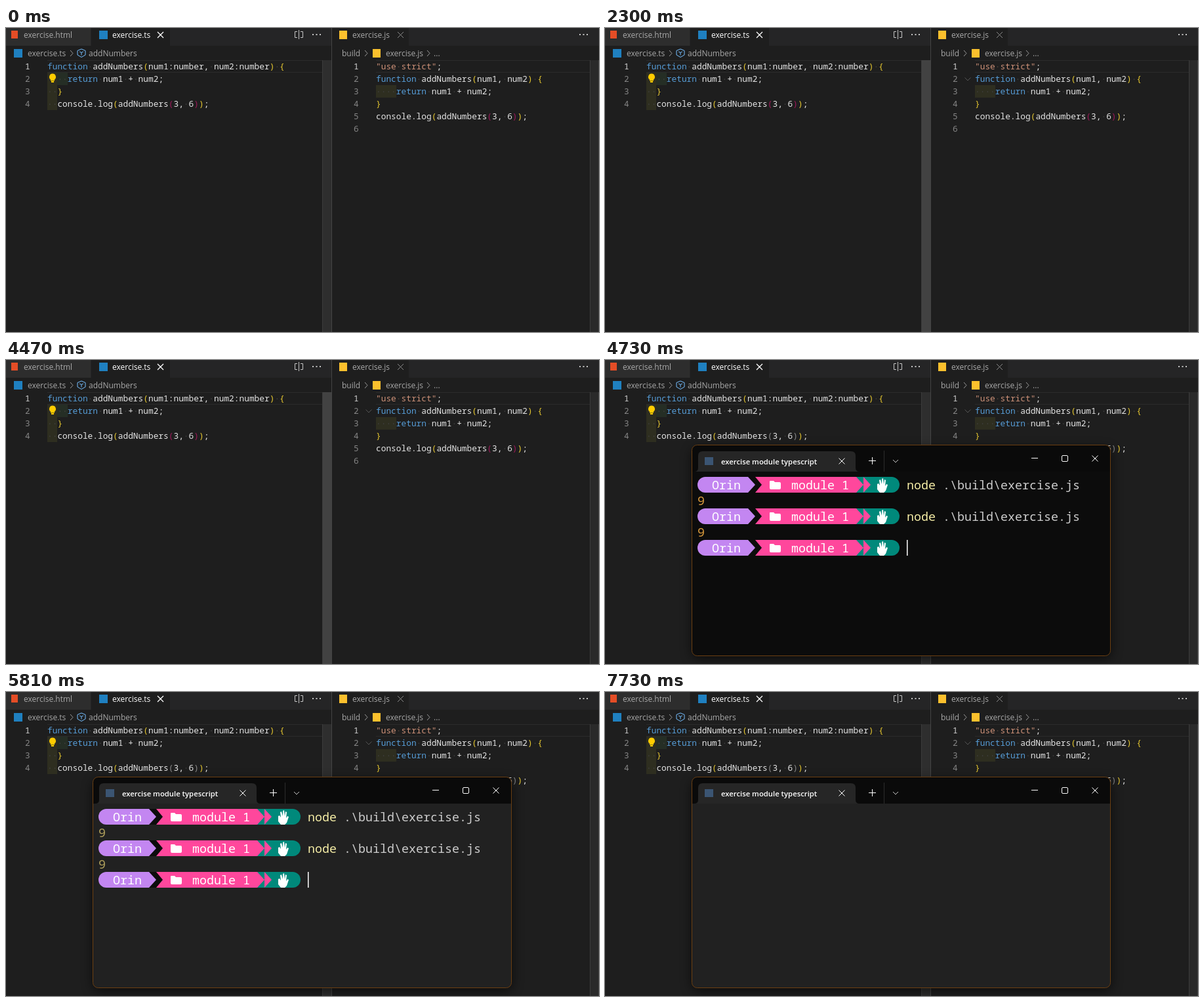
An HTML page that plays this animation: 904x463 px, repeating every 8 s.

```html
<!DOCTYPE html>
<html lang="en">
<head>
<meta charset="utf-8">
<title>Editor and terminal</title>
<style>
  html, body { margin: 0; width: 100%; height: 100%; overflow: hidden; background: #1e1e1e; }
  svg { display: block; width: 904px; height: 463px; }
  text { white-space: pre; }
  .ui { font: 12px "Open Sans", sans-serif; fill: #a9a9a9; }
  .code { font: 12.83px "Noto Sans Mono", monospace; fill: #e4e4e4; }
  .term { font: 500 18.33px "Noto Sans Mono", monospace; fill: #ccc; }
  .title { font: 600 11.3px "Open Sans", sans-serif; fill: #fff; }
  .line { fill: none; stroke: #c5c5c5; }
  .white { stroke: #fff; }
</style>
</head>
<body>
<svg viewBox="0 0 904 463">
  <defs>
    <filter id="shadow" x="-10%" y="-15%" width="120%" height="135%">
      <feGaussianBlur stdDeviation="9"/>
    </filter>
    <g id="prompt">
      <path fill="#0c0c0c" d="M218 0h22v24h-22z"/>
      <path fill="#c386f1" d="M153 0h65l11 12-11 12h-65a12 12 0 0 1 0-24z"/>
      <path fill="#00897b" d="M383 0h54a12 12 0 0 1 0 24h-54z"/>
      <path fill="#ff479c" d="M229 0h154l11 12-11 12H229l10-12zM394 0l11 12-11 12z"/>
      <path fill="#fff" d="M251 7q0-1 1-1h5l2 2h7q2 0 2 2v7q0 2-2 2h-13q-2 0-2-2z"/>
      <path fill="#fff" d="M415 11l2-1 2 3-1-8 2-1 2 7V3l2-1 1 9 1-7 2 1-1 9 2-3 2 1-3 9-3 3h-6l-4-5z"/>
      <text class="term" x="163" y="19" style="fill:#fff">Orin</text>
      <text class="term" x="284" y="19" style="fill:#fff">module 1</text>
    </g>
  </defs>

  <rect width="904" height="463" fill="#1e1e1e"/>
  <path fill="#252526" d="M0 0h496v27H0zM497 0h407v27H497z"/>
  <rect width="129" height="27" fill="#2d2d2d"/>
  <path fill="#1e1e1e" d="M130 0h120v27H130zM497 0h117v27H497z"/>

  <!-- tabs and breadcrumbs -->
  <rect x="8" y="4" width="10" height="12" fill="#e44d26"/>
  <path fill="#1f80c0" d="M142 4h13v13h-13zM12 32h13v13H12z"/>
  <path fill="#fbc02d" d="M508 4h12v13h-12zM559 32h12v13h-12z"/>
  <g class="ui">
    <text x="27" y="15">exercise.html</text>
    <text x="162" y="15" style="fill:#fff">exercise.ts</text>
    <text x="528" y="15">exercise.js</text>
    <text x="33" y="43">exercise.ts</text>
    <text x="126" y="43">addNumbers</text>
    <text x="512" y="43">build</text>
    <text x="579" y="43">exercise.js</text>
    <text x="652" y="43">...</text>
  </g>
  <path class="line white" stroke-width="1.3" d="M231 6l9 9m0-9l-9 9"/>
  <path class="line" style="stroke:#8c8c8c" d="M597 6l9 9m0-9l-9 9"/>
  <path class="line" d="M446.500 3v14M444 5.500h-3.500v9h3.500M449 5.500h3.500v9h-3.500"/>
  <path fill="#c5c5c5" d="M467 9h2v2h-2zm5.500 0h2v2h-2zm5.500 0h2v2h-2zM874 9h2v2h-2zm5.500 0h2v2h-2zm5.500 0h2v2h-2z"/>
  <path class="line" style="stroke:#999" d="M98 34l4 4.500-4 4.500M547 34l4 4.500-4 4.500M642 34l4 4.500-4 4.500"/>
  <path class="line" style="stroke:#75beff" d="M115 32l6 2.500v6.500l-6 3.500-6-3.500v-6.500zM112 36l3 1.500 3-1.500M115 37.500v4"/>

  <!-- editors -->
  <path class="line" style="stroke:#2b2b2b" d="M63 49.500h419M63 67.500h419M564 49.500h326M564 67.500h326"/>
  <path fill="#2e2e20" d="M63 68h15v57H63zM564 87h31v19h-31z"/>
  <path fill="#252e25" d="M78 68h16v19H78z"/>
  <g id="code"></g>
  <path fill="#fc0" d="M71 69.500a5 5 0 0 1 3 9v2h-6v-2a5 5 0 0 1 3-9zM69 81h4v2h-4z"/>
  <path id="fold" class="line" style="stroke:#555" d="M548.500 75.500l4.500 4.500 4.500-4.500"/>
  <rect id="leftBar" x="483" y="49" width="13" height="414"/>
  <rect id="rightBar" x="891" y="49" width="12" height="414"/>
  <path class="line" style="stroke:#3c3c3c" d="M482.500 49v414M890.500 49v414M903.500 49v414"/>
  <path class="line" style="stroke:#444" d="M496.500 0v463"/>

  <g id="terminal">
    <rect x="133" y="136" width="638" height="318" rx="8" filter="url(#shadow)" opacity=".65"/>
    <rect id="body" x="132.500" y="129.500" width="638" height="321" rx="8"/>
    <path fill="#0a0a0a" d="M133 170v-33q0-7 7-7h623q7 0 7 7v33z"/>
    <path fill="#262626" d="M136 170q6 0 6-6v-18q0-7 7-7h226q7 0 7 7v18q0 6 6 6z"/>
    <rect x="132.500" y="129.500" width="638" height="321" rx="8" fill="none" stroke="#6b3f12"/>
    <rect x="152" y="148" width="13" height="12" fill="#3b5573"/>
    <text class="title" x="177" y="159">exercise module typescript</text>
    <path class="line white" d="M356.500 149.500l9 9m0-9l-9 9M402 153.500h11M407.500 148v11M650 149.500h10M742.500 145.500l9 9m0-9l-9 9"/>
    <rect class="line white" x="696.500" y="145.500" width="9" height="9" rx="1.500"/>
    <path class="line" d="M439 152l4 4 4-4"/>
    <path class="line" style="stroke:#2c2c2c" d="M425.500 138v32"/>
    <g id="session">
      <use href="#prompt" y="178"/>
      <use href="#prompt" y="226"/>
      <use href="#prompt" y="274"/>
      <g id="commands" class="term"></g>
    </g>
    <rect id="cursor" width="1.500" height="24" fill="#fff"/>
  </g>
</svg>
<script>
const LOOP = 8000;
const $ = id => document.getElementById(id);
const set = (id, name, value) => $(id).setAttribute(name, value);
const show = (id, on) => set(id, "visibility", on ? "visible" : "hidden");

// Markup: {k keyword} {s string} {g outer bracket} {m inner bracket}
const styles = { k: "#569cd6", s: "#ce9178", g: "#e8c930", m: "#a0195a" };
const call = "console.log{g(}addNumbers{m(}3, 6{m)}{g)};";
const sources = [
  { x: 63, numberX: 29, rows: [
    "{kfunction} addNumbers{g(}num1:number, num2:number{g)} {g{}",
    "    {kreturn} num1 + num2;",
    "  {g}}",
    "  " + call ] },
  { x: 564, numberX: 530, rows: [
    "{s\"use strict\"};",
    "{kfunction} addNumbers{g(}num1, num2{g)} {g{}",
    "    {kreturn} num1 + num2;",
    "{g}}",
    call,
    "" ] }
];

const markUp = row => row
  .replace(/{([ksgm])(.[^}]*)}/g, (_, key, text) =>
    `<tspan class="${key}" fill="${styles[key]}">${text.replace(/ /g, "\u00a0")}</tspan>`)
  .replace(/ (?![^<]*>)/g, '<tspan fill="#424242">·</tspan>')
  .replace(/\u00a0/g, '</tspan><tspan fill="#5a473e">·</tspan><tspan fill="#ce9178">');

$("code").innerHTML = sources.map(({ x, numberX, rows }) => rows.map((row, i) => {
  const y = 63 + 19 * i;
  return `<text class="code" x="${numberX}" y="${y}" style="fill:${i ? "#858585" : "#d0d0d0"}">${i + 1}</text>
    <text class="code" x="${x}" y="${y}">${markUp(row)}</text>`;
}).join("")).join("");

const nodeCommand = '<tspan fill="#f5eda6">node</tspan> .\\build\\exercise.js';
$("commands").innerHTML = [0, 1].map(i => `
  <text x="460" y="${197 + 48 * i}">${nodeCommand}</text>
  <text class="result" x="141" y="${221 + 48 * i}">9</text>`).join("") +
  `<text id="recalled" x="460" y="293">${nodeCommand}</text>
   <text id="clear" x="460" y="293" fill="#f5eda6">cls</text>`;

const innerBrackets = document.querySelectorAll(".m");
const results = document.querySelectorAll(".result");

// Value of the last [time, value] step that has been reached.
const at = (t, steps) => steps.filter(([start]) => t >= start).pop()[1];

function draw(t) {
  const open = t >= 4730, cleared = t >= 7200;
  set("leftBar", "fill", at(t, [[0, "#2e2e2e"], [340, "#282828"], [1820, "#363636"],
    [1890, "#424242"], [4060, "#484848"], [4470, "#424242"], [4730, "#2e2e2e"]]));
  set("rightBar", "fill", at(t, [[0, "#2a2a2a"], [340, "#424242"], [1820, "#383838"],
    [1890, "#303030"], [2300, "#2a2a2a"]]));
  show("fold", t >= 1820);
  innerBrackets.forEach(b => b.setAttribute("fill", open ? "#8a8a8a" : styles.m));

  set("terminal", "display", open ? "inline" : "none");
  set("body", "fill", at(t, [[0, "#0c0c0c"], [4800, "#212121"]]));
  results.forEach(r => r.style.fill = t < 4800 ? "#d99a3c" : "#b0a05c");
  set("session", "display", cleared ? "none" : "inline");
  set("recalled", "display", t >= 6140 && t < 6540 ? "inline" : "none");
  set("clear", "display", t >= 6540 ? "inline" : "none");

  set("cursor", "x", at(t, [[0, 460], [6140, 724], [6540, 493], [7200, 141]]));
  set("cursor", "y", cleared ? 178 : 274);
  set("cursor", "display",
    at(t, [[0, "inline"], [5280, "none"], [5810, "inline"], [7730, "none"]]));
}

const startTime = performance.now();
function tick() {
  draw((performance.now() - startTime) % LOOP);
  requestAnimationFrame(tick);
}
tick();
</script>
</body>
</html>
```
